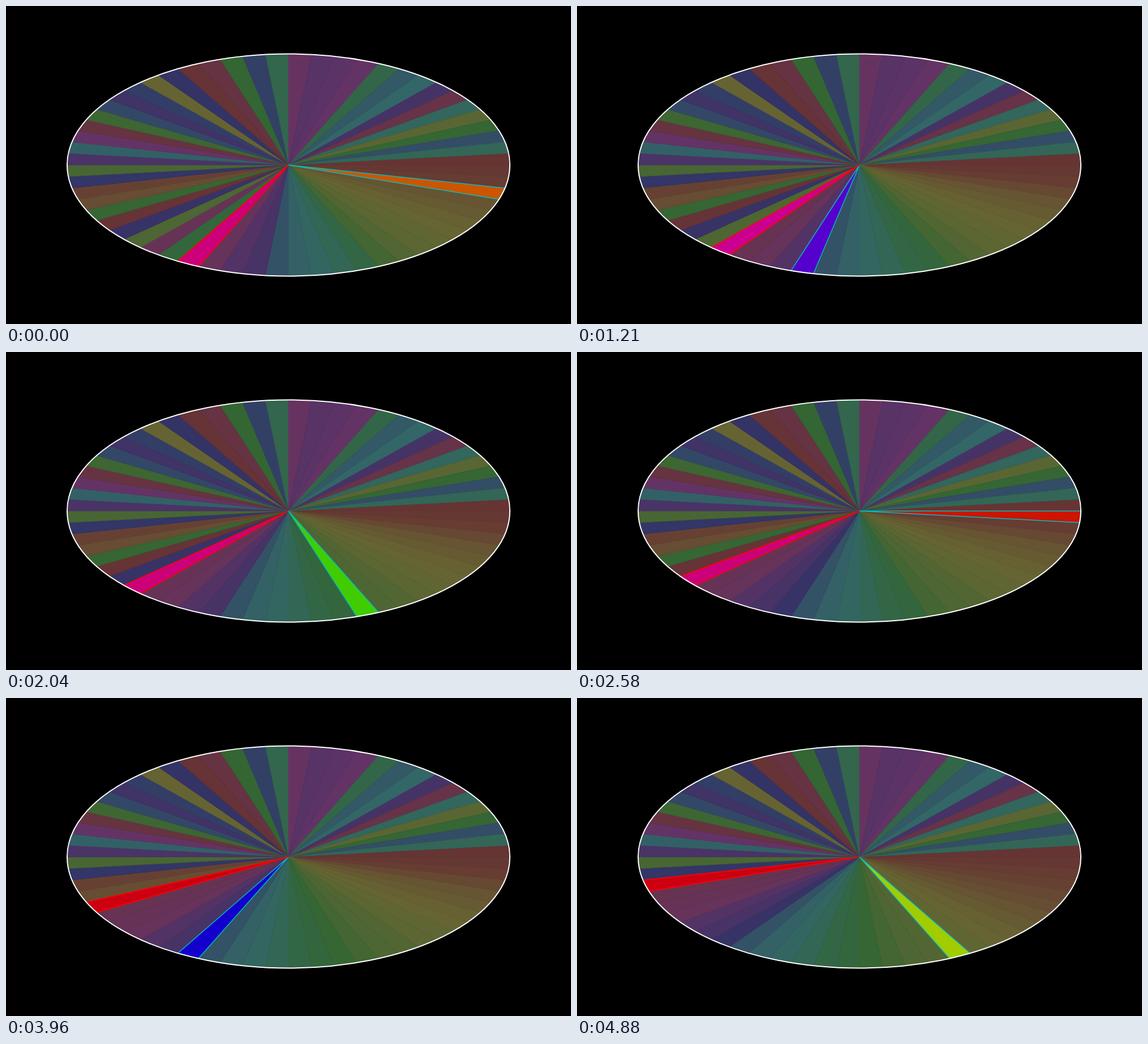
An HTML page that plays this animation: 998x561 px, repeating every 4930 ms.

```html
<!DOCTYPE html>
<html lang="en">
<head>
<meta charset="utf-8">
<title>Insertion sort wheel</title>
<style>
  html, body { margin: 0; width: 100%; height: 100%; overflow: hidden; background: #000; }
  svg { display: block; width: 100%; height: 100%; }
</style>
</head>
<body>
<svg id="stage" viewBox="0 0 998 561"></svg>
<script>
const LOOP = 4930, FRAME = 1000 / 24, LAST_FRAME = 117;
const CX = 499, CY = 280.5, RX = 391, RY = 196;

// Hue of each slice, clockwise from the one just above the right-hand axis.
const HUES = [
  1, 6, 10, 25, 39, 46, 53, 58, 67, 73, 84, 101, 140, 159, 173,
  186, 203, 265, 278, 314, 324, 130, 317.6, 89, 246, 355, 117, 30, 17, 236,
  95, 267, 187, 298, 345, 108, 215, 255, 227, 57, 240, 356, 341, 120, 225,
  150, 306, 282, 288, 298, 145, 197, 180, 262, 335, 168, 75, 118, 210, 162
];

// [frame, comparisons done]; the display stalls briefly after the first.
const PACE = [[0, 0], [1, 3], [9, 3], [10, 22], [29, 69], [49, 119], [62, 151],
  [81, 198], [95, 233], [113, 276], [117, 286]];

const stage = document.getElementById('stage');

function add(tag, attrs) {
  const node = document.createElementNS('http://www.w3.org/2000/svg', tag);
  set(node, attrs);
  stage.appendChild(node);
  return node;
}

function set(node, attrs) {
  for (const name in attrs) node.setAttribute(name, attrs[name]);
}

function rim(index) {
  const angle = (index - 1) * Math.PI * 2 / HUES.length;
  return `${(CX + RX * Math.cos(angle)).toFixed(2)} ${(CY + RY * Math.sin(angle)).toFixed(2)}`;
}

const wedge = index => `M${CX} ${CY}L${rim(index)}L${rim(index + 1)}Z`;
const dim = hue => `hsl(${hue}, 33.3%, 30%)`;
const bright = hue => `hsl(${hue}, 100%, 40%)`;

const slices = HUES.map((hue, i) => add('path', { d: wedge(i), 'stroke-width': 0.5 }));
const probe = add('path', { stroke: '#00bebe', 'stroke-width': 1.5, 'stroke-linejoin': 'bevel' });
const current = add('path', { stroke: '#ff0000', 'stroke-width': 1.7, 'stroke-linejoin': 'bevel' });
add('ellipse', { cx: CX, cy: CY, rx: RX, ry: RY, fill: 'none', stroke: '#fff', 'stroke-width': 2 });

function stepAt(frame) {
  const k = Math.max(1, PACE.findIndex(([f]) => f >= frame));
  const [f0, s0] = PACE[k - 1], [f1, s1] = PACE[k];
  return Math.floor(s0 + (s1 - s0) * (frame - f0) / (f1 - f0) + 1e-6);
}

// Scan up to the insertion point, insert, then scan the same prefix again.
function sortTo(steps) {
  const hues = HUES.slice();
  let i = 20, j = 3;
  while (steps-- > 0) {
    if (hues[j] > hues[i]) {
      hues.splice(j, 0, hues.splice(i, 1)[0]);
      j = 0;
    } else if (++j === i) {
      i++;
      j = 0;
    }
  }
  return { hues, i, j };
}

function draw(time) {
  const frame = Math.min(LAST_FRAME, Math.floor((time + 5) / FRAME));
  const { hues, i, j } = sortTo(stepAt(frame));
  slices.forEach((slice, k) => set(slice, { fill: dim(hues[k]), stroke: dim(hues[k]) }));
  set(probe, { d: wedge(j), fill: bright(hues[j]) });
  set(current, { d: wedge(i), fill: bright(hues[i]) });
}

const start = performance.now();
function tick() {
  draw((performance.now() - start) % LOOP);
  requestAnimationFrame(tick);
}
tick();
</script>
</body>
</html>
```
